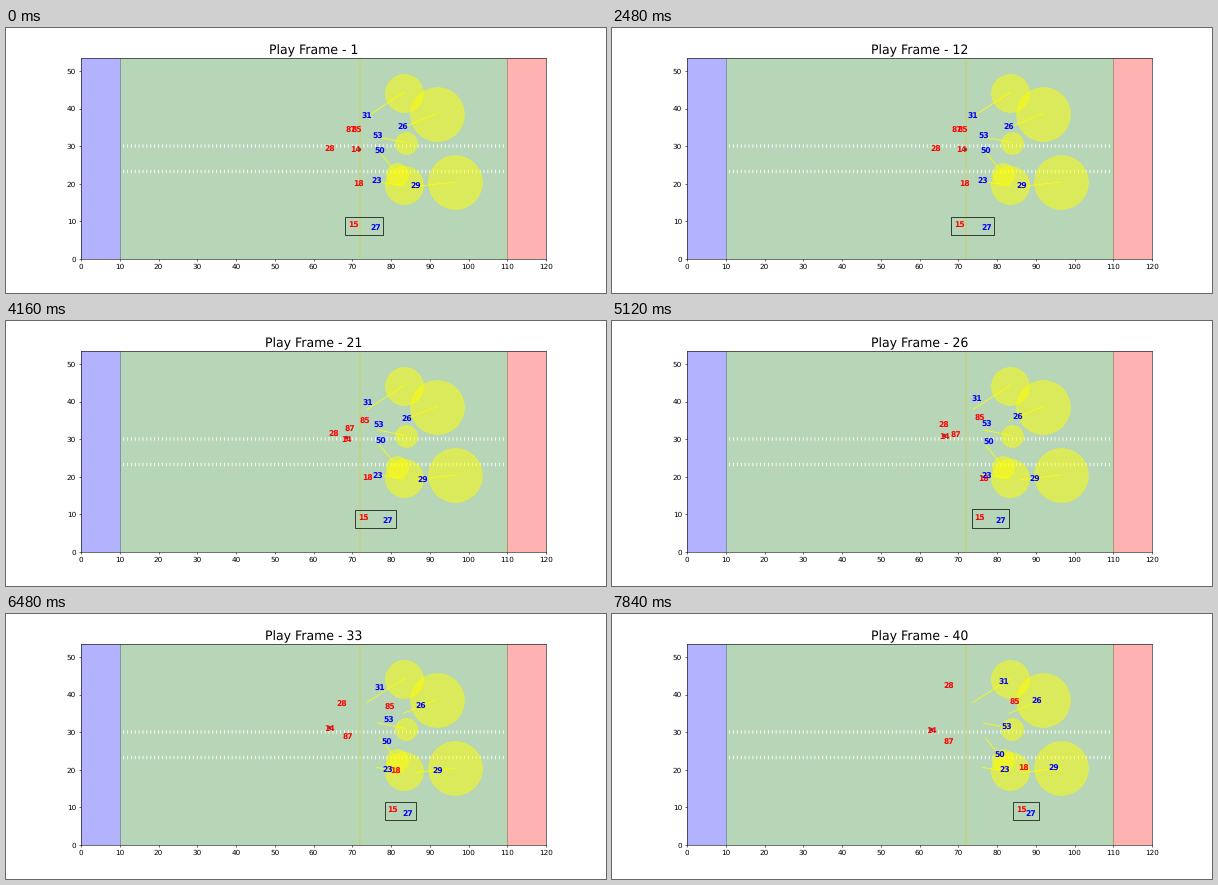
Animation of 600 by 265 pixels, one loop 8000 ms. Source, as a matplotlib script:

```python
import numpy as np
import matplotlib.pyplot as plt
from matplotlib.animation import FuncAnimation
from matplotlib.patches import Rectangle

plt.rcParams["text.hinting"] = "no_hinting"

W, H, DPI = 600, 265, 50
LEFT, RIGHT, BOTTOM, TOP = 0.125, 0.9, 34 / 265, 0.885
LENGTH, WIDTH = 120, 53.3
TICK, LOOP = 80, 8000             # ms per drawn frame, ms per loop
START, STEP, LAST = 94, 193, 40   # play clock: offset, ms per play frame
SNAP = 13                         # play frame where the run begins
QB, RECEIVER, MARKER = 14, 15, 27
SPOT = (353.5, 121)               # ball before the snap, in stage pixels

# Runs in stage pixels: start, optional bend, end
RUNS = {
    28: [(324, 121.5), (338, 97), (336.5, 73)],
    QB: [(349, 121.5), (319, 110.5), (319.5, 117)],
    18: [(352, 157), (381.5, 161), (411, 154.5)],
    85: [(350.5, 102.5), (403, 88.5)],
    87: [(344.5, 102.5), (344.5, 124), (337, 129)],
    RECEIVER: [(347, 196.5), (409, 196)],
}

# Zone defenders: home, zone centre, marker area, ease power, upward bow
ZONES = {
    31: ((361, 88.5), (398, 64.5), 3000, 2.8, 7),
    26: ((397, 99.5), (431, 85.5), 6000, 1.6, -1),
    53: ((371.5, 109), (399.5, 114.5), 1000, 2.5, 6),
    50: ((373.5, 124), (391, 145.5), 1000, 2.1, 6),
    23: ((370.5, 153.5), (398, 157.5), 3000, 2.2, -2),
    29: ((409.5, 158.5), (449, 154), 6000, 1.2, -2),
}
REACH = 0.82   # share of the way to the zone covered by the last frame


def to_field(x, y):
    """Stage pixels to yards."""
    fx = (x / W - LEFT) / (RIGHT - LEFT) * LENGTH
    fy = (1 - y / H - BOTTOM) / (TOP - BOTTOM) * WIDTH
    return fx, fy


def lerp(a, b, t):
    return (1 - t) * np.asarray(a) + t * np.asarray(b)


def run(points, u):
    """Speed up along a straight or once-bent route."""
    w = u ** 1.5
    while len(points) > 1:
        points = [lerp(a, b, w) for a, b in zip(points, points[1:])]
    return points[0]


def drop(home, zone, power, bow, u):
    """Ease from home toward the zone, bowing off the straight line."""
    return lerp(home, zone, REACH * u ** power) - (0, bow * np.sin(np.pi * u))


def positions(n):
    u = np.clip((n - SNAP) / (LAST - SNAP), 0, 1)
    pos = {num: run(pts, u) for num, pts in RUNS.items()}
    for num, (home, zone, _, power, bow) in ZONES.items():
        pos[num] = drop(home, zone, power, bow, u)
    # Man coverage: back off before the snap, then close in
    gap = np.interp(n, [1, 16, LAST], [22.5, 29, 10])
    pos[MARKER] = pos[RECEIVER] + (gap, 3.5)
    hand = pos[QB] - (0.5, 2)
    pos["ball"] = lerp(SPOT, hand, np.clip((n - 15) / 6, 0, 1))
    return pos


fig = plt.figure(figsize=(W / DPI, H / DPI), dpi=DPI, facecolor="white")
ax = fig.add_axes([LEFT, BOTTOM, RIGHT - LEFT, TOP - BOTTOM])
ax.set_xlim(0, LENGTH)
ax.set_ylim(0, WIDTH)
ax.set_xticks(range(0, 121, 10))
ax.set_yticks(range(0, 51, 10))
ax.tick_params(labelsize=10.5)

# Field
for x0, x1, color in [(0, 10, "blue"), (110, 120, "red"), (10, 110, "#127612")]:
    ax.axvspan(x0, x1, color=color, alpha=0.3, zorder=0.5)
for y in (22.91, 29.73):
    ax.vlines(range(11, 110), y, y + 0.66, color="white", lw=1.3,
              capstyle="projecting", snap=False, zorder=1)
ax.axvline(72, color="#cfd24a", lw=1.2, snap=False, zorder=1.2)

# Zones and the paths into them
for home, zone, area, _, _ in ZONES.values():
    centre = to_field(*zone)
    ax.plot(*zip(to_field(*home), centre), color="yellow", lw=1.1, zorder=2)
    ax.scatter(*centre, s=area, color="yellow", alpha=0.5, zorder=2.1)


def label(num, color, z):
    return ax.text(0, 0, str(num), color=color, size=11, weight="bold",
                   ha="center", va="center", zorder=z)


labels = {num: label(num, "red", 4) for num in RUNS}
labels.update({num: label(num, "blue", 5) for num in [*ZONES, MARKER]})
ball, = ax.plot([], [], "o", color="brown", ms=5, mew=0, zorder=4.5)
box = ax.add_patch(Rectangle((0, 0), 1, 1, fill=False, ec="black", lw=1, zorder=3))
title = ax.set_title("", fontsize=18)


def update(i):
    n = int(np.clip((i * TICK - START) // STEP, 1, LAST))
    title.set_text(f"Play Frame - {n}")
    pos = {key: to_field(*p) for key, p in positions(n).items()}
    for num, text in labels.items():
        text.set_position(pos[num])
    ball.set_data(*([v] for v in pos["ball"]))

    # Matchup box: about two yards of room around both players
    (x0, y1), (x1, y0) = pos[RECEIVER], pos[MARKER]
    box.set_bounds(x0 - 2, y0 - 1.8, x1 - x0 + 4, y1 - y0 + 3.9)
    return [title, ball, box, *labels.values()]


anim = FuncAnimation(fig, update, frames=LOOP // TICK, interval=TICK,
                     init_func=lambda: update(0), blit=False, repeat=True)
plt.show()
```
